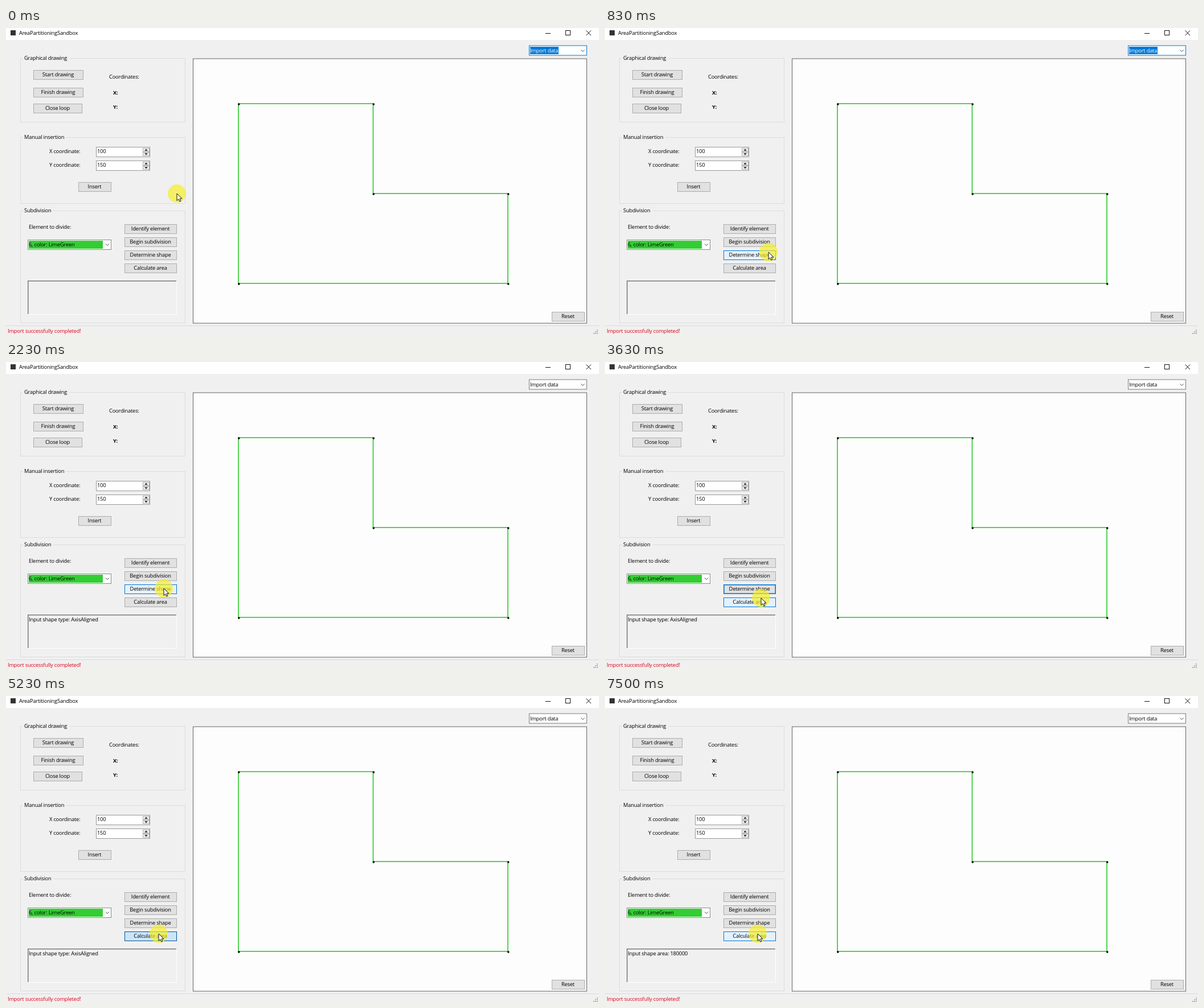
Write an HTML page with a canvas that moves like this. It is 1041 by 538 pixels and loops after 7530 ms.

```html
<!DOCTYPE html>
<html lang="en">
<head>
<meta charset="utf-8">
<style>
html, body { margin: 0; width: 100%; height: 100%; overflow: hidden; background: #f0f0f0; }
canvas { display: block; }
</style>
</head>
<body>
<canvas id="stage" width="1041" height="538"></canvas>
<script>
const ctx = document.getElementById('stage').getContext('2d');
const LOOP = 7530;
const BLUE = '#0078d7';

// Cursor path: time in ms, x, y of the tip
const path = [
  [100, 300, 291], [830, 287, 394], [870, 287, 394], [1430, 277, 398],
  [3300, 277, 398], [3630, 274, 415], [3870, 270, 417], [4030, 270, 417], [4200, 268, 418]
];
const clicks = [
  { down: 1770, up: 2100, button: 'Determine shape', result: 'Input shape type: AxisAligned' },
  { down: 5030, up: 5270, button: 'Calculate area', result: 'Input shape area: 180000' }
];
const buttons = [
  ['Start drawing', 48, 74, 88], ['Finish drawing', 48, 105, 88],
  ['Close loop', 48, 133, 86], ['Insert', 127, 271, 58],
  ['Identify element', 208, 345, 92], ['Begin subdivision', 208, 368, 92],
  ['Determine shape', 208, 391, 92], ['Calculate area', 208, 414, 92],
  ['Reset', 958, 499, 58]
];
const corners = [[408, 133], [644.5, 133], [644.5, 291], [881, 291], [881, 449], [408, 449]];

function cursorAt(t) {
  if (t <= path[0][0]) return path[0].slice(1);
  const i = path.findIndex(p => p[0] > t);
  if (i < 0) return path.at(-1).slice(1);
  const [t0, x0, y0] = path[i - 1], [t1, x1, y1] = path[i];
  const u = (t - t0) / (t1 - t0), e = u * u * (3 - 2 * u);
  return [x0 + (x1 - x0) * e, y0 + (y1 - y0) * e];
}

function fill(color, x, y, w, h) {
  ctx.fillStyle = color;
  ctx.fillRect(x, y, w, h);
}

function box(x, y, w, h, color, border, thick = 1) {
  fill(border, x, y, w, h);
  fill(color, x + thick, y + thick, w - 2 * thick, h - 2 * thick);
}

function text(str, x, middle, { color = '#000', weight = 400, align = 'left' } = {}) {
  ctx.font = `${weight} 9.3px "Open Sans", "Noto Sans", sans-serif`;
  ctx.letterSpacing = '-0.2px';
  ctx.textAlign = align;
  ctx.fillStyle = color;
  ctx.fillText(str, x, Math.round(middle + 3));
}

function stroke(points, color, width = 1, closed = false) {
  ctx.beginPath();
  points.forEach(p => ctx.lineTo(...p));
  if (closed) ctx.closePath();
  ctx.strokeStyle = color;
  ctx.lineWidth = width;
  ctx.stroke();
}

function disc(x, y, r, color) {
  ctx.beginPath();
  ctx.arc(x, y, r, 0, 7);
  ctx.fillStyle = color;
  ctx.fill();
}

const chevron = (x, y) => stroke([[x - 3, y - 1.5], [x, y + 1.5], [x + 3, y - 1.5]], '#444');

function group(title, y, h, gap) {
  ctx.strokeStyle = '#dcdcdc';
  ctx.lineWidth = 1;
  ctx.strokeRect(25.5, y + .5, 289, h);
  fill('#f0f0f0', 30, y - 2, gap, 5);
  text(title, 32, y);
}

function spinner(y, value) {
  box(158, y, 95, 18, '#fff', '#999');
  text(value, 160, y + 8);
  for (const [dy, dir] of [[2, -1], [9, 1]]) {
    box(240, y + dy, 12, 7, '#f0f0f0', '#adadad');
    const cy = y + dy + 3.5;
    ctx.beginPath();
    ctx.moveTo(243, cy - dir * 1.3);
    ctx.lineTo(249, cy - dir * 1.3);
    ctx.lineTo(246, cy + dir * 1.7);
    ctx.fillStyle = '#222';
    ctx.fill();
  }
}

function windowFrame() {
  fill('#f0f0f0', 0, 0, 1041, 538);
  fill('#fff', 0, 0, 1041, 21);
  fill('#333', 8, 4, 9, 9);
  text('AreaPartitioningSandbox', 23, 9);
  fill('#111', 947, 9, 9, 1);
  ctx.strokeStyle = '#111';
  ctx.lineWidth = 1;
  ctx.strokeRect(982.5, 4.5, 8, 8);
  stroke([[1018.5, 4.5], [1027, 13]], '#111');
  stroke([[1027, 4.5], [1018.5, 13]], '#111');

  fill('#dadada', 0, 523, 1041, 1);
  text('Import successfully completed!', 3, 532.5, { color: '#e0001b' });
  for (let r = 0; r < 3; r++)
    for (let c = 0; c <= r; c++) fill('#b0b0b0', 1037 - c * 3, 530 + r * 3, 2, 2);
}

function controls(focused) {
  group('Graphical drawing', 53, 112, 81);
  text('Coordinates:', 181, 86);
  text('X:', 188, 113.5, { weight: 700 });
  text('Y:', 188, 139, { weight: 700 });

  group('Manual insertion', 192, 116, 75);
  text('X coordinate:', 76, 217);
  text('Y coordinate:', 76, 240.5);
  spinner(209, '100');
  spinner(233, '150');

  group('Subdivision', 321, 197, 53);
  text('Element to divide:', 40, 350);
  box(38, 372, 147, 18, '#fff', '#8a8a8a');
  fill('#32cd32', 40, 374, 130, 14);
  text('6, color: LimeGreen', 40, 381);
  chevron(178, 381);

  box(918, 30.5, 102, 18, '#fff', focused ? BLUE : '#7a7a7a');
  if (focused) fill(BLUE, 920, 33, 50, 13);
  text('Import data', 920, 40, { color: focused ? '#fff' : '#000' });
  chevron(1012.5, 40);
}

function results(str) {
  fill('#fff', 38, 444, 262, 60);
  fill('#7a7a7a', 38, 444, 261, 59);
  fill('#f0f0f0', 39.5, 445.5, 259.5, 57.5);
  text(str, 40, 453);
}

function drawing() {
  box(328, 53.5, 692, 466, '#fdfdfd', '#646464');
  stroke(corners, '#1ec41e', 1.5, true);
  corners.forEach(([x, y]) => disc(x + .8, y + 1.1, 1.8, '#000'));
}

function button([label, x, y, w, h = 17], mouse, focus, pressed) {
  const hover = mouse[0] >= x && mouse[0] < x + w && mouse[1] >= y && mouse[1] < y + h;
  if (pressed === label) box(x, y, w, h, '#cce4f7', '#005499');
  else if (hover) box(x, y, w, h, '#e5f1fb', BLUE);
  else if (focus === label) box(x, y, w, h, '#e1e1e1', BLUE, 1.6);
  else box(x, y, w, h, '#e1e1e1', '#adadad');
  text(label, x + w / 2 - .5, y + 8, { align: 'center' });
}

function cursor([x, y]) {
  disc(x, y, 16, 'rgba(246,239,35,.68)');
  const shape = [[0, 0], [0, 12.5], [2.9, 9.8], [4.8, 14.2], [6.9, 13.3], [5, 9], [9, 9]];
  ctx.beginPath();
  shape.forEach(([dx, dy]) => ctx.lineTo(x + dx, y + dy));
  ctx.closePath();
  ctx.fillStyle = '#fff';
  ctx.fill();
  ctx.strokeStyle = '#111';
  ctx.lineWidth = 1;
  ctx.stroke();
}

function render(now) {
  const t = now % LOOP;
  const mouse = cursorAt(t);
  const last = clicks.findLast(c => t >= c.down);
  const done = clicks.findLast(c => t >= c.up);
  const pressed = last && t < last.up ? last.button : null;

  windowFrame();
  controls(!last);
  results(done ? done.result : '');
  drawing();
  buttons.forEach(b => button(b, mouse, last && last.button, pressed));
  cursor(mouse);
  requestAnimationFrame(render);
}
requestAnimationFrame(render);
</script>
</body>
</html>
```
